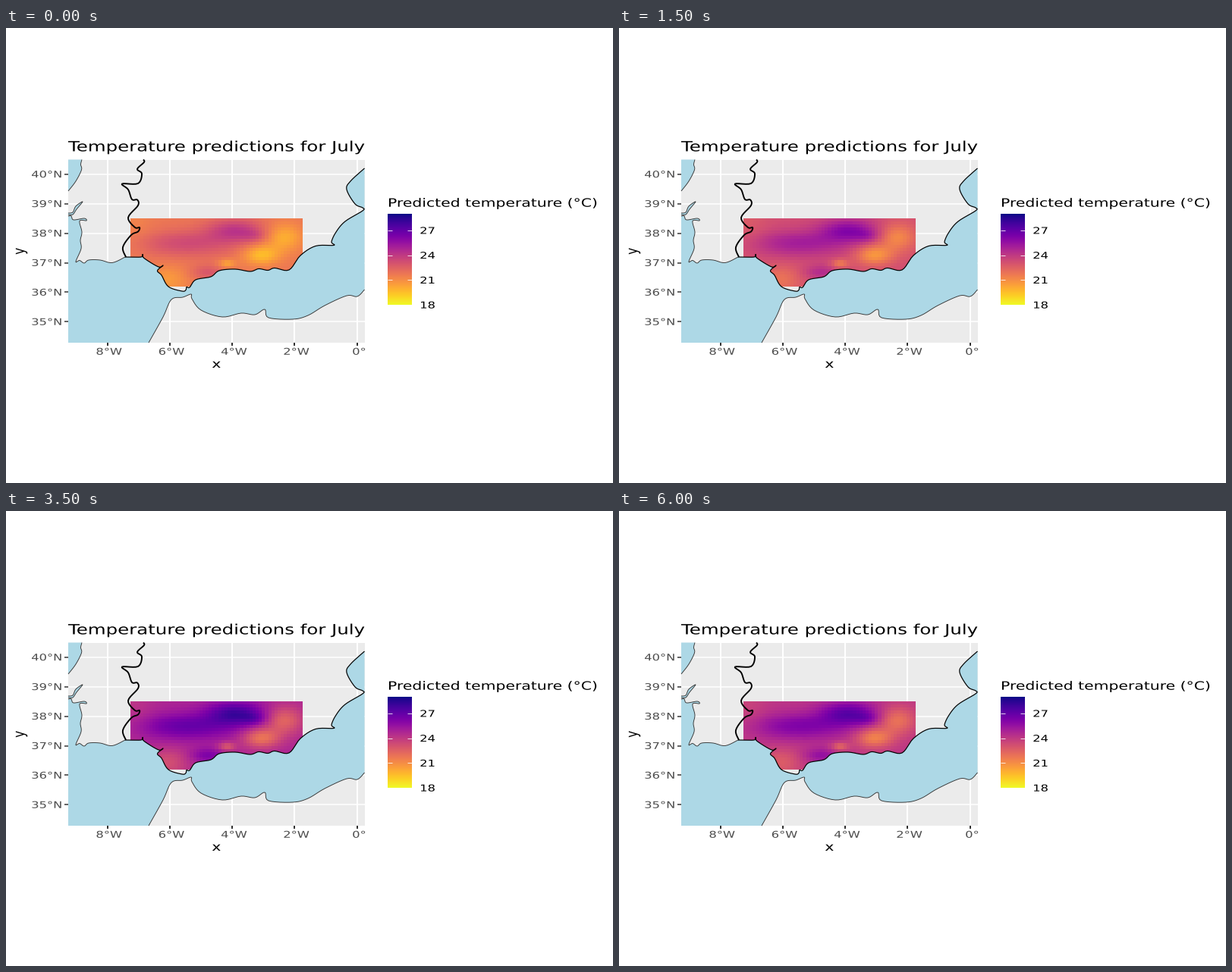
Write a matplotlib script that moves like this. It is 800 by 600 pixels and loops after 6.5 s.

```python
import numpy as np
import matplotlib.pyplot as plt
from matplotlib.animation import FuncAnimation
from matplotlib.patches import PathPatch, Polygon, Rectangle
from matplotlib.textpath import TextPath
from matplotlib.transforms import Affine2D

W, H, DPI = 800, 600, 100
FRAMES, INTERVAL = 13, 500
SX, SY = W / 432, H / 432          # a square 6 inch plot shown on a 4:3 stage
LEFT, RIGHT, TOP, BOTTOM = 82, 472.5, 173.5, 415
T_MIN, T_MAX = 18, 29
CMAP = plt.get_cmap("plasma_r")
GREY = "#333333"


def lon_x(lon):
    return 462.7 + 41.15 * lon


def lat_y(lat):
    return 192.8 + 38.9 * (40 - lat)


fig = plt.figure(figsize=(W / DPI, H / DPI), dpi=DPI, facecolor="white")
ax = fig.add_axes([0, 0, 1, 1])
ax.set_axis_off()


def line(xs, ys, color, px, z):
    ax.plot(xs, ys, color=color, lw=px * 72 / DPI, zorder=z,
            solid_capstyle="butt", solid_joinstyle="round")


def label(text, x, y, size, color="black", align=0.0, angle=0):
    """Draw text with its baseline at y; align 0, 0.5 or 1 picks the anchor."""
    path = TextPath((0, 0), text, size=size, prop={"family": "DejaVu Sans"})
    box = path.get_extents()
    anchor = {0: 0, 0.5: (box.x0 + box.x1) / 2, 1: box.x1}[align]
    move = (Affine2D().translate(-anchor, 0).rotate_deg(angle)
            .scale(SX, -SY).translate(x, y))
    ax.add_patch(PathPatch(move.transform_path(path), fc=color, lw=0, zorder=10))


def curve(points, samples=6):
    """Catmull-Rom spline through a few key points."""
    p = np.array([points[0], *points, points[-1]], float)
    a, b, c, d = (p[i:len(p) - 3 + i, None] for i in range(4))
    t = np.linspace(0, 1, samples, endpoint=False)[None, :, None]
    path = 0.5 * (2 * b + (c - a) * t + (2 * a - 5 * b + 4 * c - d) * t ** 2
                  + (3 * b - a - 3 * c + d) * t ** 3)
    return np.vstack([path.reshape(-1, 2), p[-1]])


# Key points of coasts and border, in stage pixels
north_west = curve([(100, 173.5), (98.5, 180), (99.5, 187), (92, 202), (82, 215)])
estuary = curve([(82, 244), (88, 243), (92, 235), (101, 229), (93, 239),
                 (88, 246), (82, 246)])
west = curve([(82, 248), (86, 248), (89, 253), (103, 251), (106, 254),
              (97, 254.5), (100, 269), (98, 280), (99, 291), (92, 308),
              (97, 306.5), (103, 310), (109, 306), (124, 306), (140, 309.5),
              (157, 302)])
south = curve([(157, 302), (178, 302), (180, 298.5), (182, 303.5), (201, 315),
               (207, 313), (199.5, 320), (205, 326), (214, 341), (232, 347),
               (237, 345.5), (238, 341.5), (242, 342), (250, 332), (270, 328),
               (281, 320), (302, 318), (322, 321), (333, 317.5), (345, 319.5),
               (354, 316.5), (373, 319), (388, 300), (408, 287.5), (432, 286.5),
               (429, 282), (435, 269), (447, 255), (470, 241), (470, 237),
               (460, 232), (449, 213), (454, 202), (472.5, 185)])
africa = curve([(188, 415), (207, 381), (218, 358), (233, 355), (244, 351),
                (245, 357), (257, 372), (285, 381), (310, 376), (328, 378),
                (341, 371), (346, 382), (378, 384), (398, 379), (420, 366),
                (449, 353), (463, 354), (472.5, 345)])
border = curve([(181, 173.5), (182, 177), (173, 186), (179, 192), (174, 205),
                (153, 205.5), (161, 213), (166, 226), (173, 226.5), (174, 234),
                (161, 250), (170, 263), (176, 263), (174, 268.5), (165, 273),
                (154, 289), (158, 302)])


def draw_map():
    ax.add_patch(Rectangle((LEFT, TOP), RIGHT - LEFT, BOTTOM - TOP,
                           fc="#EBEBEB", lw=0, zorder=0))
    for lat in range(35, 41):
        y = lat_y(lat)
        line([LEFT, RIGHT], [y, y], "white", 1.5, 1)
        line([LEFT - 5.1, LEFT], [y, y], GREY, 1.5, 1)
        label(f"{lat}°N", 72.7, y + 4.4, 8.8, "#4D4D4D", 1)
    for lon in range(-8, 1, 2):
        x = lon_x(lon)
        line([x, x], [TOP, BOTTOM], "white", 2, 1)
        line([x, x], [BOTTOM, BOTTOM + 3.8], GREY, 2, 1)
        label(f"{-lon}°W" if lon else "0°", x + 2.5, 430.8, 8.8, "#4D4D4D", 0.5)

    ocean = np.vstack([west, south, africa[::-1], [(LEFT, BOTTOM)]])
    for sea in (np.vstack([north_west, [(LEFT, TOP)]]), estuary, ocean):
        ax.add_patch(Polygon(sea, fc="lightblue", lw=0, zorder=3))
    for shore in (north_west, estuary, west, africa):
        line(*shore.T, GREY, 0.9, 4)
    line(*south.T, "black", 1.2, 4)
    line(*border.T, "black", 1.9, 4)


def draw_legend():
    x0, x1, y0, y1 = 503, 535, 245.2, 365.2
    ramp = np.linspace(T_MAX, T_MIN, 300)[:, None]
    ax.imshow(ramp, cmap=CMAP, vmin=T_MIN, vmax=T_MAX, aspect="auto",
              extent=(x0, x1, y1, y0), zorder=5)
    tick = (x1 - x0) / 5
    for temp in range(18, 28, 3):
        y = y1 - (temp - T_MIN) / (T_MAX - T_MIN) * (y1 - y0)
        for a in (x0, x1 - tick):
            line([a, a + tick], [y, y], "white", 0.8, 6)
        label(str(temp), 545.2, y + 4.4, 8.8)
    label("Predicted temperature (°C)", 503, 235.7, 11)


# Raster of 0.1 degree cells
cell_x, cell_y = np.meshgrid(lon_x(np.arange(-7.2, -1.75, 0.1)),
                             lat_y(np.arange(38.45, 36.2, -0.1)))

# Warm and cool spots: centre x, y, spread x, y, strength
spots = [(302, 267, 26, 11, 2.6), (328, 274, 12, 6, 0.9),
         (238, 284, 46, 12, 1.8), (266, 322, 16, 7, 1.3),
         (366, 276, 17, 13, -2.1), (336, 299, 17, 9, -2.5),
         (291, 310, 8, 4, -1.7), (213, 332, 20, 14, -1.3),
         (166, 262, 20, 30, -0.5)]
relief = sum(s * np.exp(-((cell_x - x) / sx) ** 2 / 2 - ((cell_y - y) / sy) ** 2 / 2)
             for x, y, sx, sy, s in spots)


def field(step):
    """Warm years return every five steps, and hot years show more contrast."""
    swing = (1.45 * np.cos(2 * np.pi * (step - 2) / 5)
             + 0.3 * np.cos(np.pi * (step - 7) / 5))
    return 23 + swing + (1 + 0.1 * swing) * relief


draw_map()
draw_legend()
label("Temperature predictions for July", LEFT, 162.5, 13.2)
label("x", 277.3, 448, 11, align=0.5)
label("y", 24, 294.3, 11, align=0.5, angle=90)
raster = ax.imshow(field(0), cmap=CMAP, vmin=T_MIN, vmax=T_MAX, aspect="auto",
                   interpolation="nearest", zorder=2,
                   extent=(lon_x(-7.25), lon_x(-1.75), lat_y(36.2), lat_y(38.5)))
ax.set_xlim(0, W)
ax.set_ylim(H, 0)


def update(step):
    raster.set_data(field(step))
    return [raster]


anim = FuncAnimation(fig, update, frames=FRAMES, interval=INTERVAL,
                     repeat=True, repeat_delay=0, blit=False)
plt.show()
```
